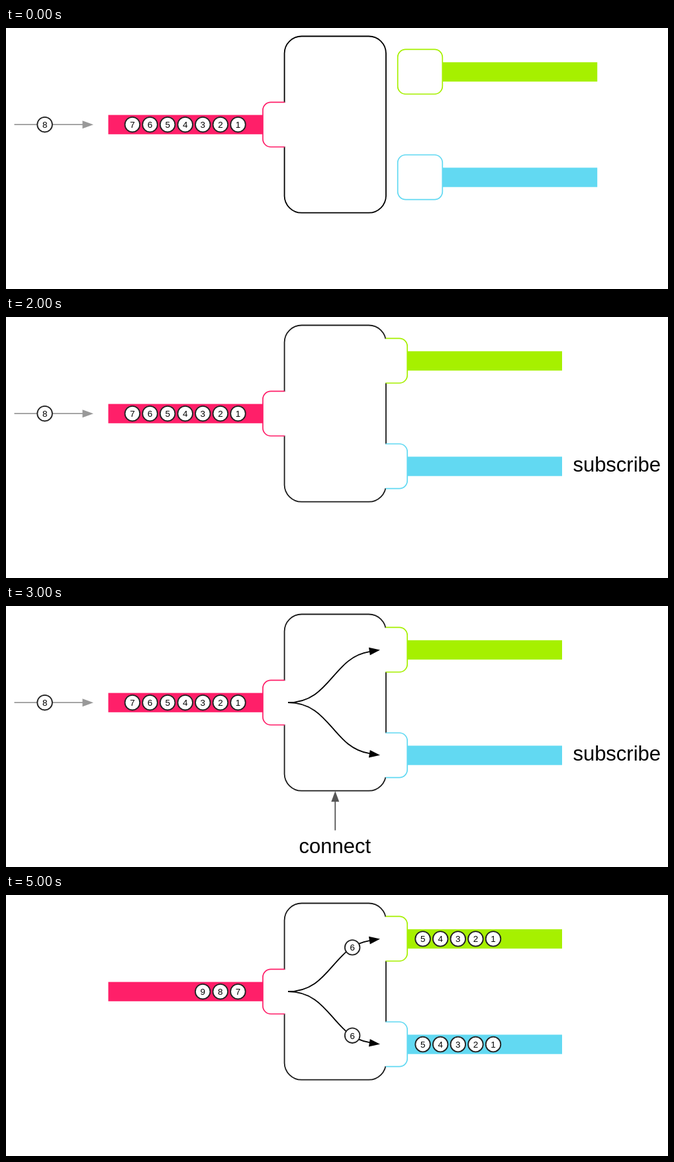
Recreate the animation shown at these times as an HTML page. Size 1000x395 px, loop 6000 ms.

```html
<!DOCTYPE html>
<html lang="en">
<head>
<meta charset="utf-8">
<title>Publish and connect</title>
<style>
  html, body { margin: 0; width: 100%; height: 100%; overflow: hidden; background: #fff; }
  svg { display: block; width: 1000px; height: 395px; font-family: "Liberation Sans", Arial, sans-serif; }
  .port { fill: #fff; stroke-width: 1.7; }
  .line { fill: none; stroke: #000; stroke-width: 1.8; }
  .ball circle { fill: #fff; stroke: #222; stroke-width: 1.8; }
  .ball text { font-size: 13.4px; text-anchor: middle; }
  .label { font-size: 31px; }
</style>
</head>
<body>
<svg viewBox="0 0 1000 395">
  <defs>
    <g id="free">
      <rect class="port" x="591.7" y="32.4" width="67.6" height="67.6" rx="12"/>
      <rect x="659.5" y="51.8" width="233.7" height="29.3" stroke="none"/>
    </g>
    <g id="docked">
      <path d="M565 33.2H578V99.4H565Z" fill="#fff" stroke="none"/>
      <path class="port" d="M573.5 32.4H594.2a12 12 0 0 1 12 12V88a12 12 0 0 1 -12 12H573.5"/>
      <rect x="606.3" y="51.8" width="233.7" height="29.3" stroke="none"/>
    </g>
    <g id="branch">
      <path class="line" d="M426 146.2C490 146.2 493 78 549 69.2"/>
      <path d="M565 66.6L548 62.8L549.8 74.4Z"/>
    </g>
  </defs>

  <rect id="box" x="420.6" y="12.5" width="153.4" height="267.2" rx="26" fill="none" stroke-width="1.8"/>

  <g fill="#ff1f69" stroke="#ff1f69">
    <path d="M417 113H425V179.4H417Z" fill="#fff" stroke="none"/>
    <path class="port" d="M421 112.3H400a12 12 0 0 0 -12 12V168a12 12 0 0 0 12 12H421"/>
    <rect x="154.5" y="131.6" width="233.5" height="29.2" stroke="none"/>
  </g>

  <g fill="#a6f000" stroke="#a6f000">
    <use href="#free" data-on="0 1"/>
    <use href="#docked" data-on="1 6"/>
  </g>
  <g fill="#62d9f2" stroke="#62d9f2" transform="translate(0 159.6)">
    <use href="#free" data-on="0 2"/>
    <use href="#docked" data-on="2 6"/>
  </g>

  <g data-on="3 6">
    <use href="#branch"/>
    <use href="#branch" transform="matrix(1 0 0 -1 0 292.4)"/>
  </g>

  <g data-on="0 4">
    <path d="M12.5 146.2H117" stroke="#999" stroke-width="1.8"/>
    <path d="M132 146.2L115.5 140.2V152.2Z" fill="#999"/>
  </g>
  <g data-on="3 4">
    <path d="M497.3 339.5V295" stroke="#555" stroke-width="1.8"/>
    <path d="M497.3 280L491.3 296.3H503.3Z" fill="#555"/>
    <text class="label" x="442.5" y="373.6">connect</text>
  </g>
  <text class="label" x="850" y="74.3" data-on="1 2">subscribe</text>
  <text class="label" x="856.4" y="234" data-on="2 4">subscribe</text>
</svg>
<script>
  const svg = document.querySelector('svg');
  const box = document.getElementById('box');
  const GAP = 26.6, MID = 146.2, TOP = 66.4, LOW = 226;

  function add(parent, tag, attrs) {
    const el = document.createElementNS('http://www.w3.org/2000/svg', tag);
    for (const key in attrs) el.setAttribute(key, attrs[key]);
    return parent.appendChild(el);
  }

  function ball(parent, n, x, y) {
    const g = add(parent, 'g', { class: 'ball', transform: `translate(${x} ${y})` });
    add(g, 'circle', { r: 11.3 });
    add(g, 'text', { y: 4.8 }).textContent = n;
  }

  // Numbers count down from left to right.
  function row(parent, high, low, x, y) {
    for (let n = high; n >= low; n--) ball(parent, n, x + (high - n) * GAP, y);
  }

  function scene(from, to) {
    return add(svg, 'g', { 'data-on': `${from} ${to}` });
  }

  const waiting = scene(0, 4);
  ball(waiting, 8, 58.6, MID);
  row(waiting, 7, 1, 190.9, MID);

  function flow(step, n, x) {
    const g = scene(step, step + 1);
    row(g, 9, n + 1, x, MID);
    for (const y of [79.4, 212.7]) ball(g, n, 523.2, y);
    for (const y of [TOP, LOW]) row(g, n - 1, 1, 629.6, y);
  }
  flow(4, 3, 230.8);
  flow(5, 6, 297.2);

  const parts = [...document.querySelectorAll('[data-on]')].map(el => {
    const [from, to] = el.dataset.on.split(' ').map(Number);
    return { el, from, to };
  });

  let shown = -1;
  function show(step) {
    if (step === shown) return;
    shown = step;
    for (const { el, from, to } of parts) {
      el.style.display = step >= from && step < to ? '' : 'none';
    }
    box.setAttribute('stroke', step < 2 ? '#000' : '#1c1c1c');
  }

  const start = performance.now();
  function tick() {
    show(Math.floor((performance.now() - start) / 1000) % 6);
    requestAnimationFrame(tick);
  }
  tick();
</script>
</body>
</html>
```
